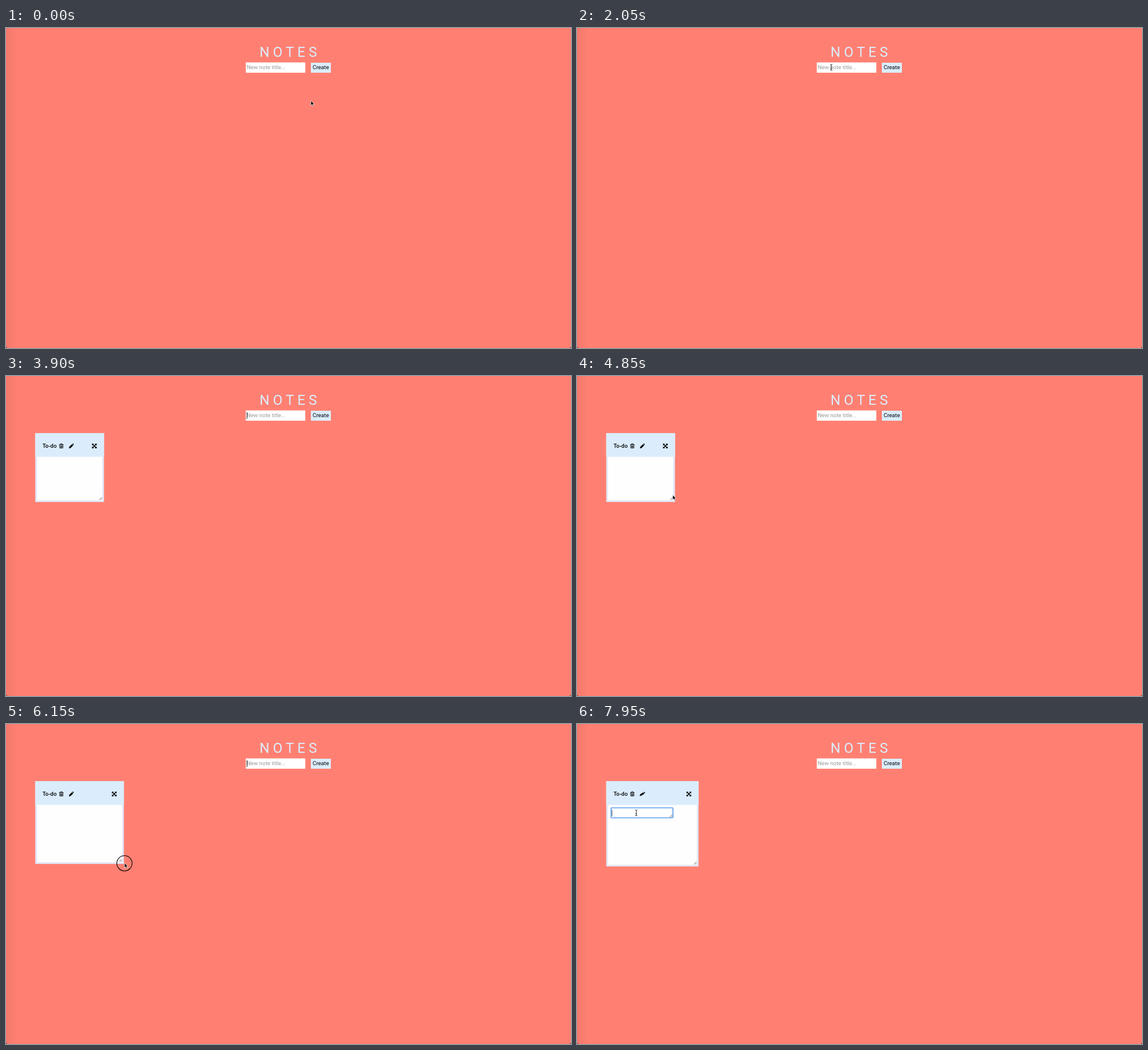
An HTML page that plays this animation: 960 by 544 pixels, repeating every 8000 ms.

```html
<!DOCTYPE html>
<html lang="en">
<head>
<meta charset="utf-8">
<title>Notes</title>
<style>
  html, body { margin: 0; width: 100%; height: 100%; overflow: hidden; background: #ff8072; }
  svg { display: block; width: 960px; height: 544px; font: 9.5px Roboto, sans-serif; }
</style>
</head>
<body>
<svg viewBox="0 0 960 544">
  <defs>
    <linearGradient id="shade">
      <stop stop-color="#000" stop-opacity=".05"/>
      <stop offset="1" stop-color="#000" stop-opacity="0"/>
    </linearGradient>
    <path id="gripLines" d="M-4.5 0L0 -4.5M-2 0L0 -2" stroke="#555" stroke-width=".8"/>
  </defs>
  <rect width="960" height="544" fill="#ff8072"/>
  <rect width="20" height="544" fill="url(#shade)"/>
  <path d="M0 542v2h2zM960 542v2h-2z" fill="#433"/>

  <text x="430.7" y="49" font-size="23.7" letter-spacing="5.8" fill="#dbedfd">NOTES</text>
  <rect x="407.5" y="58.5" width="101" height="17.5" fill="#fff"/>
  <text id="placeholder" x="409" y="70.3" fill="#999">New note title...</text>
  <text id="typed" x="409" y="70.3"></text>
  <rect id="caret" y="61.5" width="1" height="11.5" fill="#333"/>
  <rect x="518" y="59" width="34" height="17" fill="#dbedfd"/>
  <text x="521" y="70.3">Create</text>
  <g id="suggestion">
    <rect x="407.5" y="76.5" width="101" height="14.5" fill="#fff" stroke="#ccc" stroke-width=".6"/>
    <text x="409" y="87">To-do</text>
  </g>

  <g id="note">
    <rect id="card" x="49.7" y="97.2" fill="#e2e8fb"/>
    <rect id="header" x="49.7" y="97.2" height="40.3" fill="#dbedfd"/>
    <rect id="page" x="52.5" y="137.5" fill="#fefefe"/>
    <text x="62" y="122.3" font-weight="500">To-do</text>
    <path d="M90.3 116.6h7.4M92.5 116.4v-1.1h3v1.1M91.3 117v5.4h5.4V117M93 118v3.6M94 118v3.6M95 118v3.6"
          fill="none" stroke="#000" stroke-width=".9"/>
    <path id="pencil" d="M-4 4L-3.4 1.3L1 -3.1L3.1 -1L-1.3 3.4ZM1.6 -3.6L2.3 -4.1Q2.8 -4.4 3.3 -4L4 -3.3Q4.4 -2.8 4.1 -2.3L3.6 -1.6Z"/>
    <g id="expand">
      <path d="M-2.7 -2.7L2.7 2.7M2.7 -2.7L-2.7 2.7" stroke="#000" stroke-width="1.5"/>
      <path d="M-4 -4h3.3L-4 -.7zM4 -4v3.3L.7 -4zM4 4H.7L4 .7zM-4 4V.7L-.7 4z"/>
    </g>
    <use id="grip" href="#gripLines"/>
  </g>

  <g id="editor">
    <rect id="ring" x="57.8" y="142.5" width="105.2" height="17" rx="1" fill="#fff"/>
    <use href="#gripLines" x="162" y="158.5"/>
    <rect id="editCaret" x="59" y="146" width=".8" height="10.5" fill="#444"/>
  </g>

  <g id="mouse">
    <circle id="press" r="13" fill="none" stroke="#000" stroke-width="1.1"/>
    <path id="arrow" d="M0 -.5V7.7L1.9 6L3.1 8.8L4.5 8.2L3.3 5.5H5.8Z" stroke="#fff" stroke-width=".7"/>
    <path id="beam" d="M-2 -5Q0 -5 0 -3.8Q0 -5 2 -5M0 -4V4M-2 5Q0 5 0 3.8Q0 5 2 5M-1.2 1.3H1.2"
          fill="none" stroke="#222" stroke-width=".9"/>
  </g>
</svg>
<script>
const LOOP = 8000, STEP = 50, BLINK = 500;
const FOCUS = 1550, TYPE = 2200, ENTER = 3900, BLUR = 6650, EDIT = 7050, EDIT_FOCUS = 7500;
const TITLE = 'To-do';
const el = Object.fromEntries([...document.querySelectorAll('[id]')].map(e => [e.id, e]));

// Pointer gestures, each eased from wherever the last one ended
const gestures = [
  { from: 0, to: 250, x: 459, y: 81 },
  { from: 350, to: 700, x: 436, y: 60 },
  { from: 850, to: 1300, x: 432, y: 67 },
  { from: 4000, to: 4950, x: 154, y: 207 },
  { from: 5000, to: 5500, x: 163, y: 210 },
  { from: 5800, to: 6200, x: 203, y: 238 },
  { from: 6250, to: 6850, x: 112, y: 125 },
  { from: 7100, to: 7450, x: 100.7, y: 151 }
];
const drag = gestures[5];

const show = (node, on) => node.setAttribute('visibility', on ? 'inherit' : 'hidden');
const move = (node, x, y, turn = 0) => node.setAttribute('transform', `translate(${x} ${y}) rotate(${turn})`);
const resize = (node, w, h) => { node.setAttribute('width', w); node.setAttribute('height', h); };
const between = (t, from, to) => t >= from && t < to;
const inside = (x, y, left, top, w, h) => between(x, left, left + w) && between(y, top, top + h);

function pointer(t) {
  let x = 518, y = 124;
  for (const g of gestures) {
    const k = Math.min(1, Math.max(0, (t - g.from) / (g.to - g.from)));
    const ease = k * k * (3 - 2 * k);
    x += (g.x - x) * ease;
    y += (g.y - y) * ease;
  }
  return [x, y];
}

function drawInput(t) {
  // Keystrokes come faster towards the end of the word
  const typedBy = i => TYPE + 1400 * Math.sin(i * Math.PI / 8);
  const text = t < ENTER ? [...TITLE].filter((_, i) => t >= typedBy(i)).join('') : '';
  el.typed.textContent = text;
  show(el.placeholder, !text);
  show(el.suggestion, text.length === 1);

  const typing = between(t, TYPE, ENTER + 250);
  const blinkStart = t < TYPE ? FOCUS : ENTER + 250;
  const lit = Math.floor((t - blinkStart) / BLINK) % 2 === 0;
  el.caret.setAttribute('x', 409 + (text ? el.typed.getComputedTextLength() : 0));
  show(el.caret, typing || between(t, FOCUS, BLUR) && lit);
}

function drawNote(t) {
  // The card trails the dragged pointer by one step
  const [x, y] = pointer(Math.min(drag.to, Math.max(drag.from, t - STEP)));
  const w = x - 46.2, h = y - 93;
  show(el.note, t >= ENTER);
  resize(el.card, w, h);
  resize(el.header, w, 40.3);
  resize(el.page, w - 5.6, h - 43.1);
  move(el.expand, w + 33.3, 119);
  move(el.grip, w + 46.2, h + 93.5);

  const editing = t >= EDIT, focused = t >= EDIT_FOCUS;
  move(el.pencil, 111, 119, editing ? 16 * Math.sin((t - EDIT) / 400 * Math.PI) : 0);
  show(el.editor, editing);
  show(el.editCaret, focused);
  el.ring.setAttribute('stroke', focused ? '#5a9fee' : '#aaa');
  el.ring.setAttribute('stroke-width', focused ? 1.6 : .6);
}

function drawPointer(t) {
  const [x, y] = pointer(t);
  const overText = inside(x, y, 407, 58, 102, 18) || t >= EDIT && inside(x, y, 57, 142, 107, 18);
  const click = at => between(t, at, at + 100);
  move(el.mouse, x, y);
  show(el.mouse, !between(t, TYPE, ENTER + 250));
  show(el.press, between(t, drag.from - 250, drag.to + 100) || click(EDIT - STEP) || click(EDIT_FOCUS));
  show(el.beam, overText);
  show(el.arrow, !overText);
}

function frame() {
  const t = Math.floor(performance.now() % LOOP / STEP) * STEP;
  drawInput(t);
  drawNote(t);
  drawPointer(t);
  requestAnimationFrame(frame);
}
frame();
</script>
</body>
</html>
```
